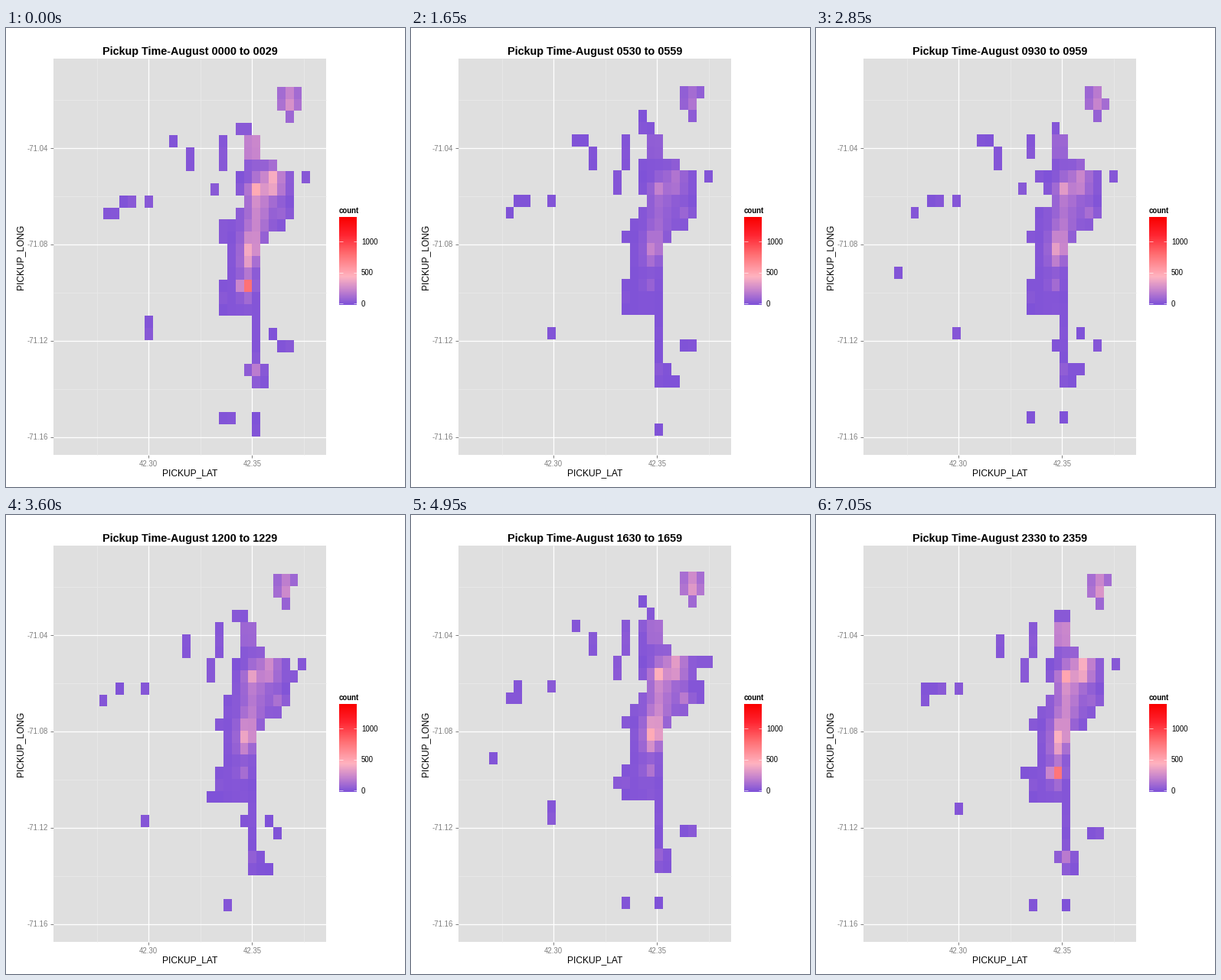
A matplotlib script that plays this animation: 521 px wide and 600 px high, repeating every 7200 ms.

```python
import numpy as np
import matplotlib.pyplot as plt
from matplotlib.animation import FuncAnimation
from matplotlib.colors import LinearSegmentedColormap

W, H, DPI = 521, 600, 100
FRAMES, INTERVAL = 48, 150
BIN_W, BIN_H = 10.8, 15.75
ROWS, COLS, FIRST_COL = 29, 28, -2
LEFT, TOP = 126.5 + FIRST_COL * BIN_W, 76.8
MAX_COUNT = 1395
GREY = "#7f7f7f"

plt.rcParams["font.family"] = "Liberation Sans"
CMAP = LinearSegmentedColormap.from_list("count", [
    (0, "#7f52d8"), (0.16, "#c583ce"), (0.32, "#ffb3c0"),
    (0.57, "#ff7074"), (0.8, "#ff2430"), (1, "#fa0000")])

# Key points of the day: hour, overall traffic and drift of the bin grid.
HOURS = [0, 3, 7.5, 12, 16.5, 19.5, 23.5]
TRAFFIC = [0.8, 0.2, 0.6, 0.7, 0.9, 1, 0.85]
DRIFT_X = [0, -2.7, -2.7, -5.4, -2.7, -5.4, -0.8]
DRIFT_Y = [0, 0.5, -1.3, 0.7, -2.3, 0.5, 0.8]

# Outline of the city centre: (row, column) corners of its two sides.
WEST_SIDE = [(3, 17), (6, 17), (7, 15.6), (9, 17), (12, 14), (13, 15),
             (15, 15), (16, 14), (18, 14), (19, 18), (24, 18)]
EAST_SIDE = [(3, 17), (4, 18), (6, 19), (7, 22), (10, 22), (11, 21),
             (12, 19), (13, 18), (22, 18), (23, 19), (24, 19)]

# Outlying streets: row, column, height, width, chance of a pickup.
STREETS = [
    (0, 21, 2, 2, 0.98), (0, 23, 2, 1, 0.7), (2, 22, 1, 1, 0.95),
    (2, 16, 2, 1, 0.5), (4, 14, 3, 1, 0.97), (4, 8, 1, 2, 0.3),
    (5, 10, 2, 1, 0.9), (7, 13, 2, 1, 0.7), (7, 24, 1, 1, 0.95),
    (9, 1, 1, 3, 0.5), (9, 5, 1, 1, 0.95), (10, 0, 1, 2, 0.35),
    (15, -2, 1, 1, 0.6), (19, 5, 2, 1, 0.5), (20, 20, 1, 1, 0.8),
    (21, 21, 1, 2, 0.8), (27, 14, 1, 2, 0.55), (27, 18, 2, 1, 0.6)]

# Hot spots: row, column, spread, count by day, extra count around midnight.
HOT_SPOTS = [
    (0.6, 22, 0.8, 380, 0), (4.5, 17.6, 0.7, 190, 200),
    (7.4, 20, 0.8, 400, 130), (8, 18, 0.6, 430, 60), (9.6, 18.3, 1, 190, 50),
    (10, 21, 0.6, 170, -80), (11.4, 17.8, 0.8, 220, 0),
    (12.8, 17.3, 0.7, 520, -60), (14, 17, 0.6, 190, 100),
    (16, 16.8, 0.5, 150, 700), (23, 18, 0.5, 50, 120)]

row, col = np.mgrid[0:ROWS, FIRST_COL:FIRST_COL + COLS]
rng = np.random.default_rng(8)
quiet = rng.uniform(5, 45, (ROWS, COLS))
luck = rng.random((FRAMES, ROWS, COLS))


def pickup_chance():
    west = np.round(np.interp(row, *zip(*WEST_SIDE)))
    east = np.round(np.interp(row, *zip(*EAST_SIDE)))
    outside = np.maximum(west - col, col - east)
    chance = np.select([outside <= 0, outside == 1], [1, 0.12], 0)
    chance[(row < 3) | (row > 24)] = 0
    for r, c, h, w, p in STREETS:
        c -= FIRST_COL
        chance[r:r + h, c:c + w] = p
    return chance


CHANCE = pickup_chance()


def bins_at(slot):
    hour = slot / 2
    traffic = np.interp(hour, HOURS, TRAFFIC)
    from_midnight = min(hour, 24 - hour)
    night = np.exp(-(from_midnight / 2.2) ** 2)
    count = quiet * traffic
    for r, c, spread, by_day, late in HOT_SPOTS:
        near = np.exp(-((row - r) ** 2 + (col - c) ** 2) / (2 * spread ** 2))
        count = count + near * (by_day * traffic + late * night)
    return np.ma.masked_where(luck[slot] > CHANCE, np.maximum(count, 1))


def drift_at(slot):
    """The grid jumps sideways by quarter bins and slides a little in y."""
    step = BIN_W / 4
    dx = np.interp(slot / 2, HOURS, DRIFT_X)
    return np.round(dx / step) * step, np.interp(slot / 2, HOURS, DRIFT_Y)


fig = plt.figure(figsize=(W / DPI, H / DPI), dpi=DPI, facecolor="white")
ax = fig.add_axes([0, 0, 1, 1])
ax.axis("off")


def text(x, y, s, px, **kw):
    kw.setdefault("va", "baseline")
    return ax.text(x, y, s, fontsize=px * 72 / DPI, **kw)


def line(xs, ys, color, px, z=2):
    ax.plot(xs, ys, color=color, lw=px * 72 / DPI, zorder=z,
            solid_capstyle="butt")


x0, x1, y0, y1 = 62, 418, 39.5, 557.5
ax.add_patch(plt.Rectangle((x0, y0), x1 - x0, y1 - y0, fc="#dfdfdf", lw=0))
for x in (118.5, 253.5, 388.5):
    line([x, x], [y0, y1], "#e8e8e8", 0.9)
for k in range(4):
    y = 94.2 + 126 * k
    line([x0, x1], [y, y], "#e8e8e8", 0.9)
for k in range(4):
    y = 157 + 125.9 * k
    line([x0, x1], [y, y], "white", 1.3, 2.5)
    line([x0 - 4.3, x0], [y, y], GREY, 1)
    text(54.5, y + 3.6, f"{-71.04 - 0.04 * k:.2f}", 9.6, color=GREY, ha="right")
for x, label in ((186.3, "42.30"), (321.3, "42.35")):
    line([x, x], [y0, y1], "white", 1.3, 2.5)
    line([x, x], [y1, y1 + 4.3], GREY, 1)
    text(x, 573, label, 9.6, color=GREY, ha="center")
text(240, 585.5, "PICKUP_LAT", 12, ha="center")
text(25, 299, "PICKUP_LONG", 12, rotation=90, ha="right", va="center")
title = text(240, 35, "", 14.4, weight="bold", ha="center")

text(434.7, 242.5, "count", 9.6, weight="bold")
ax.imshow(np.linspace(1, 0, 115)[:, None], cmap=CMAP, vmin=0, vmax=1,
          extent=(435, 458, 362.5, 247.5), aspect="auto", zorder=3)
for n in (0, 500, 1000):
    y = 360 - n * 0.0806
    line([435, 439.5], [y, y], "white", 0.6, 4)
    line([453.5, 458], [y, y], "white", 0.6, 4)
    text(464, y + 3.5, str(n), 9.6)

tiles = ax.imshow(bins_at(0), cmap=CMAP, vmin=0, vmax=MAX_COUNT,
                  interpolation="nearest", aspect="auto", zorder=3)
ax.set(xlim=(0, W), ylim=(H, 0))


def update(slot):
    dx, dy = drift_at(slot)
    left, top = LEFT + dx, TOP + dy
    tiles.set_data(bins_at(slot))
    tiles.set_extent((left, left + COLS * BIN_W, top + ROWS * BIN_H, top))
    hour, half = divmod(slot, 2)
    start = hour * 100 + half * 30
    title.set_text(f"Pickup Time-August {start:04d} to {start + 29:04d}")
    return tiles, title


anim = FuncAnimation(fig, update, frames=FRAMES, interval=INTERVAL,
                     repeat=True, repeat_delay=0)
plt.show()
```
